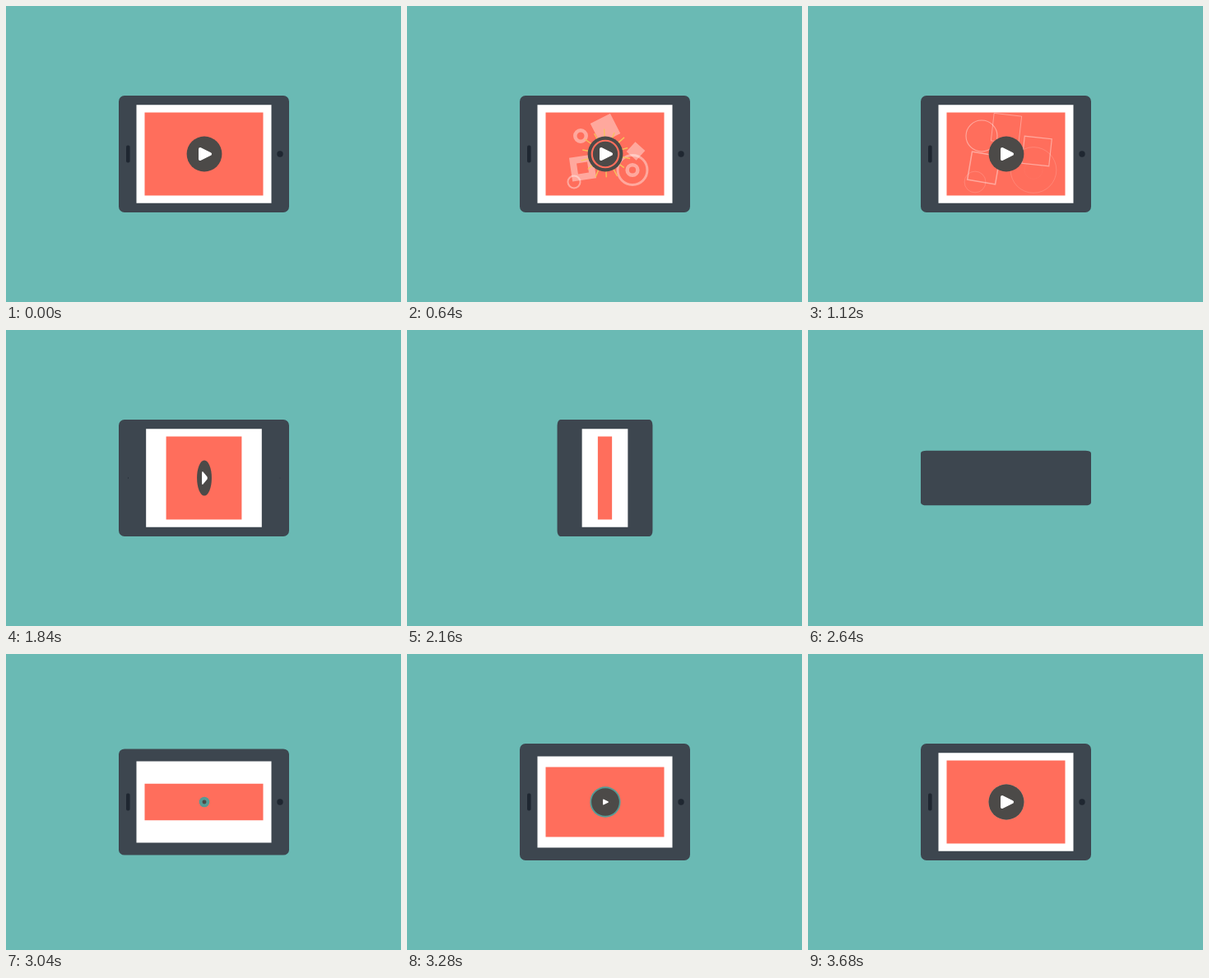
Recreate the animation shown at these times as an HTML page with a canvas. Size 480 px wide and 360 px high, loop 3720 ms.

```html
<!DOCTYPE html>
<html lang="en">
<head>
<meta charset="utf-8">
<title>Tablet player</title>
<style>
html, body { margin: 0; width: 480px; height: 360px; overflow: hidden; background: #6abab4; }
canvas { display: block; }
</style>
</head>
<body>
<canvas id="stage" width="480" height="360"></canvas>
<script>
const ctx = document.getElementById('stage').getContext('2d');
const LOOP = 3720, STEP = 40;
const CX = 240.5, CY = 180;
const BG = '#6abab4', BODY = '#3d464f', DARK = '#1f2731', RED = '#ff6e5c', BUTTON = '#4c4a48';

const clamp = v => Math.min(1, Math.max(0, v));
const prog = (t, start, dur) => clamp((t - start) / dur);
const lerp = (a, b, p) => a + (b - a) * p;
const outQuad = p => 1 - (1 - p) ** 2;
const outCubic = p => 1 - (1 - p) ** 3;

// Piecewise curve through [time, value] points
function curve(points, t) {
  if (t <= 0) return 0;
  for (let i = 1; i < points.length; i++) {
    const [t0, v0] = points[i - 1], [t1, v1] = points[i];
    if (t < t1) return lerp(v0, v1, (t - t0) / (t1 - t0));
  }
  return points[points.length - 1][1];
}

const GROW = [[0, 0], [120, .47], [320, .83], [520, .91], [600, .944], [680, 1.197], [740, 1]];

const layers = [
  { w: 207, h: 142, r: 7, fill: BODY, out: 1888, back: 2520 },
  { w: 164, h: 119.5, r: 0, fill: '#fff', out: 1752, back: 2720 },
  { w: 144, h: 101, r: 0, fill: RED, out: 1616, back: 2928 }
];
const FOLD = 618, TURN = 2516;

const shapes = [
  { kind: 'square', x: 241, y: 149, start: 520, size: 17, line: 19, thin: 2, from: -50, to: 7 },
  { kind: 'ring', x: 211, y: 158, start: 541, size: 19.2, line: 5.2, thin: 1 },
  { kind: 'square', x: 213.5, y: 197, start: 403, size: 17.3, line: 11.7, thin: 1.2, from: -37, to: 10 },
  { kind: 'ring', x: 203, y: 214, start: 427, size: 13, line: 2.8, thin: 1.15 },
  { kind: 'ring', x: 274, y: 199.5, start: 379, size: 28, line: 4.9, thin: 1.45 },
  { kind: 'ring', x: 274, y: 199.5, start: 427, size: 11, line: 10.7, thin: 3 },
  { kind: 'square', x: 278, y: 176.5, start: 579, size: 16.8, line: 9.1, thin: 1.37, from: -65, to: 7 }
];

function disc(x, y, r, fill) {
  if (r <= 0) return;
  ctx.fillStyle = fill;
  ctx.beginPath();
  ctx.arc(x, y, r, 0, Math.PI * 2);
  ctx.fill();
}

function scaled(x, y, sx, sy, draw) {
  if (sx <= 0 || sy <= 0) return;
  ctx.save();
  ctx.translate(x, y);
  ctx.scale(sx, sy);
  draw();
  ctx.restore();
}

function drawLayer(l, t) {
  const sx = t < TURN ? 1 - prog(t, l.out, FOLD) : 1;
  const sy = t < TURN ? 1 : curve(GROW, t - l.back);
  scaled(CX, CY, sx, sy, () => {
    ctx.fillStyle = l.fill;
    ctx.beginPath();
    ctx.roundRect(-l.w / 2, -l.h / 2, l.w, l.h, l.r);
    ctx.fill();
  });
}

function drawControls(t) {
  const s = t < TURN ? 1 - prog(t, 1480, 400) : outQuad(prog(t, 2720, 300));
  scaled(148.3, CY, s, s, () => {
    ctx.fillStyle = DARK;
    ctx.beginPath();
    ctx.roundRect(-2.3, -10.5, 4.6, 21, 2);
    ctx.fill();
  });
  disc(333, CY, 3.7 * s, DARK);
}

function drawShape(s, t) {
  const p = prog(t, s.start, 1280 - s.start);
  if (p <= 0 || p >= 1) return;
  const e = outCubic(p), r = s.size * e;
  ctx.save();
  ctx.translate(s.x, s.y);
  ctx.strokeStyle = 'rgba(255,255,255,.4)';
  ctx.lineWidth = Math.min(s.line * (1 - p) ** s.thin, 2 * r);
  ctx.beginPath();
  if (s.kind === 'ring') {
    ctx.arc(0, 0, r, 0, Math.PI * 2);
  } else {
    ctx.rotate(lerp(s.from, s.to, e) * Math.PI / 180);
    ctx.rect(-r, -r, 2 * r, 2 * r);
  }
  ctx.stroke();
  ctx.restore();
}

function drawRays(t) {
  const p = prog(t, 480, 330);
  if (p <= 0 || p >= 1) return;
  ctx.strokeStyle = '#f6c35c';
  ctx.lineWidth = 1.7 * (1 - p * .4);
  for (let i = 0; i < 14; i++) {
    const a = (i + .4) / 14 * Math.PI * 2;
    const tip = 20 + (i % 2 ? 14 : 18) * outQuad(p) * .8;
    const tail = lerp(14, tip, p * p * .9 + .1);
    ctx.beginPath();
    ctx.moveTo(241 + Math.cos(a) * tail, CY + Math.sin(a) * tail);
    ctx.lineTo(241 + Math.cos(a) * tip, CY + Math.sin(a) * tip);
    ctx.stroke();
  }
}

function drawTriangle() {
  ctx.fillStyle = ctx.strokeStyle = '#fff';
  ctx.lineWidth = 4;
  ctx.lineJoin = 'round';
  ctx.beginPath();
  ctx.moveTo(-5, -6);
  ctx.lineTo(7, 0);
  ctx.lineTo(-5, 6);
  ctx.closePath();
  ctx.fill();
  ctx.stroke();
}

function drawButton(t) {
  if (t >= TURN) {
    disc(241, CY, 21.4 * outQuad(prog(t, 2960, 500)), '#559b95');
    disc(241, CY, 21.4 * outQuad(prog(t, 3010, 500)), BUTTON);
    const s = outQuad(prog(t, 3200, 330));
    scaled(241, CY, s, s, drawTriangle);
    return;
  }
  scaled(241, CY, 1 - prog(t, 1480, FOLD), 1, () => {
    disc(0, 0, 21.4, BUTTON);
    const p = prog(t, 160, 600);
    if (p > 0 && p < 1) {
      ctx.strokeStyle = RED;
      ctx.lineWidth = 5 * (1 - p) + 1.2;
      ctx.beginPath();
      ctx.arc(0, 0, 20.3 * p, 0, Math.PI * 2);
      ctx.stroke();
    }
    drawTriangle();
  });
}

function draw(t) {
  ctx.fillStyle = BG;
  ctx.fillRect(0, 0, 480, 360);
  drawLayer(layers[0], t);
  drawControls(t);
  drawLayer(layers[1], t);
  drawLayer(layers[2], t);
  ctx.save();
  ctx.beginPath();
  ctx.rect(168.5, 129.5, 144, 101);
  ctx.clip();
  shapes.forEach(s => drawShape(s, t));
  drawRays(t);
  ctx.restore();
  drawButton(t);
}

const begin = performance.now();
function tick() {
  const t = (performance.now() - begin) % LOOP;
  draw(Math.floor(t / STEP) * STEP);
  requestAnimationFrame(tick);
}
tick();
</script>
</body>
</html>
```
